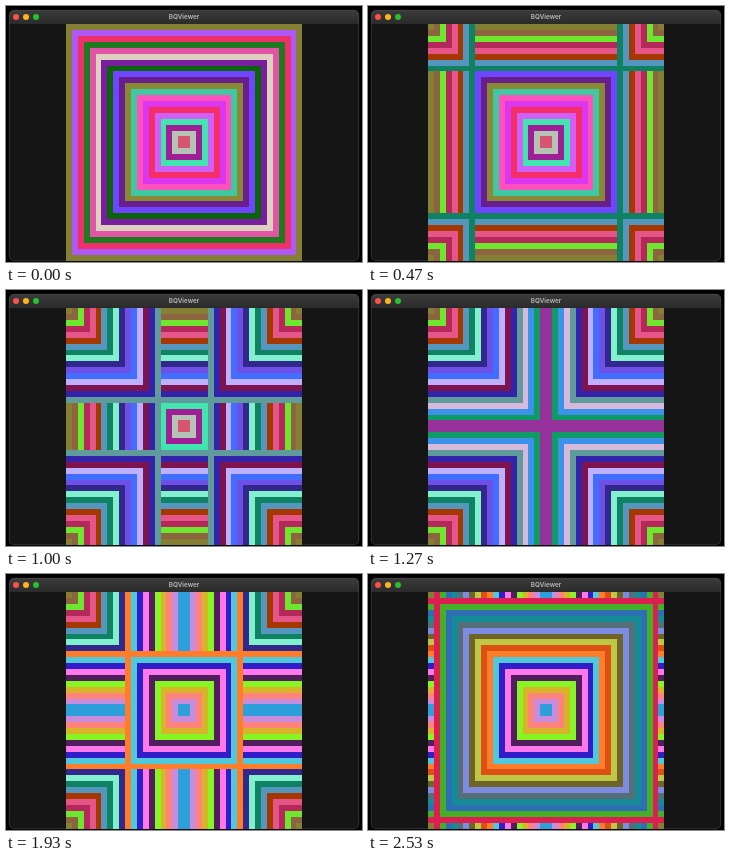
Animation of 356 by 256 pixels, one loop 2.6 s. Source, as an HTML page:

```html
<!DOCTYPE html>
<html lang="en">
<head>
<meta charset="utf-8">
<title>BQViewer</title>
<style>
  html, body { margin: 0; width: 100%; height: 100%; overflow: hidden; background: #000; }
  svg { display: block; width: 100vw; height: 100vh; }
  text { font: 600 6.4px Inter, "Open Sans", sans-serif; fill: #b9b9b9; text-anchor: middle; }
</style>
</head>
<body>
<svg viewBox="0 0 356 256">
  <defs>
    <linearGradient id="bar" x2="0" y2="1">
      <stop stop-color="#3b3b3b"/>
      <stop offset="1" stop-color="#2b2b2b"/>
    </linearGradient>
    <clipPath id="win"><rect x="3" y="4" width="350" height="251" rx="5"/></clipPath>
  </defs>
  <g clip-path="url(#win)">
    <rect width="356" height="256" fill="#151515"/>
    <rect y="4" width="356" height="14" fill="url(#bar)"/>
  </g>
  <rect x="3.25" y="4.25" width="349.5" height="250.5" rx="5" fill="none" stroke="#505050" stroke-width=".5"/>
  <circle cx="10" cy="11" r="3" fill="#fb5149"/>
  <circle cx="20" cy="11" r="3" fill="#fdb421"/>
  <circle cx="30" cy="11" r="3" fill="#27c131"/>
  <text x="178" y="13.2">BQViewer</text>
  <g id="grid" transform="translate(60 18.2) scale(5.91)" shape-rendering="crispEdges"/>
</svg>
<script>
const SIZE = 40, HALF = 20, STEPS = 39;

// Colours by distance from the edge: starting rings, inward pass, outward pass
const rings = ('857f33 ae58f6 f0306a 1e7a1e e055a5 ddd0be 7a1ea0 0a640a 6e46ff 6a1e8c ' +
  '8a8a35 40c8a0 ff50be dc37f0 f52d69 d25ff5 41e6af a01e96 b4c3b4 d7556e').split(' ');
const inward = ('857f33 8c6440 6ee62d b4285a e65587 a53700 5596be 0f8264 82f0cd 32288c ' +
  '6e50e6 416eff beafff 7d1450 3223aa 5f9b9b d7b9dc 3c91eb 0f9b64 96329b').split(' ');
const outward = ('857f33 dc1e50 46af28 2d6eb4 148c96 556e78 7d8ce1 6e6428 bec846 dc5014 ' +
  'ff7d28 50c8dc 321ec8 ff78eb 501e5f 87f523 d7b428 ff827d c88cdc 2da0dc').split(' ');

const grid = document.getElementById('grid');

function addPath(d, color) {
  const path = document.createElementNS('http://www.w3.org/2000/svg', 'path');
  path.setAttribute('d', d);
  path.setAttribute('fill', '#' + color);
  return grid.appendChild(path);
}

const box = (x, y, w, h) => `M${x} ${y}h${w}v${h}h${-w}z`;

// Two full rows and two full columns, k cells from each edge
function cross(k) {
  const far = SIZE - 1 - k;
  return [k, far].map(p => box(0, p, SIZE, 1) + box(p, 0, 1, SIZE)).join('');
}

rings.forEach((color, k) => addPath(box(k, k, SIZE - 2 * k, SIZE - 2 * k), color));

const lines = Array.from({ length: STEPS }, (_, i) => {
  const k = i < HALF ? i : STEPS - i;
  return addPath(cross(k), (i < HALF ? inward : outward)[k]);
});

// 15 steps a second, starting on whole hundredths
function render(ms) {
  const step = Math.floor((Math.floor(ms % 2600 / 10) + 0.5) * 0.15);
  lines.forEach((line, i) => line.setAttribute('display', i <= step ? 'inline' : 'none'));
}

function tick() {
  render(performance.now());
  requestAnimationFrame(tick);
}
tick();
</script>
</body>
</html>
```
